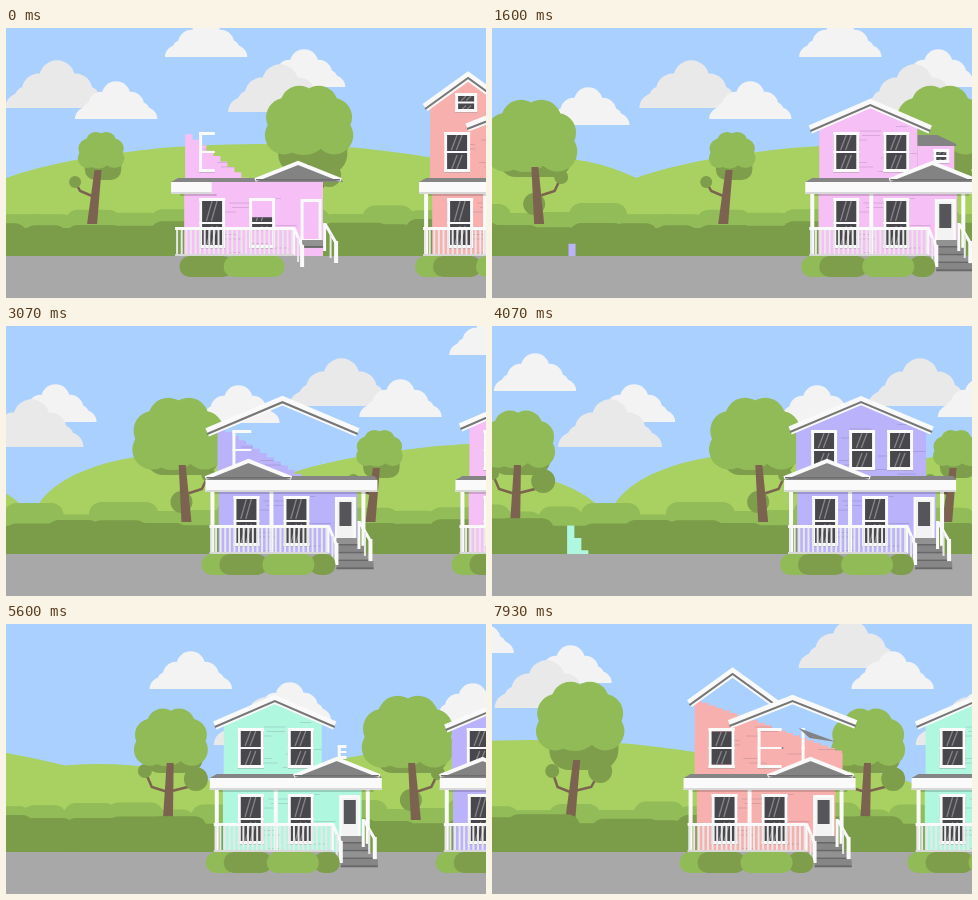
These frames come from a looping animation (480x270 px, 8 s). An HTML page with a canvas:

```html
<!DOCTYPE html>
<html lang="en">
<head>
<meta charset="utf-8">
<title>Street of houses</title>
<style>
html, body { margin: 0; width: 100%; height: 100%; overflow: hidden; background: #aad0ff; }
canvas { display: block; width: 100vw; height: 100vh; }
</style>
</head>
<body>
<canvas id="stage" width="480" height="270"></canvas>
<script>
const ctx = document.getElementById('stage').getContext('2d');
const LOOP = 8000, LAP = 10300;
const WHITE = '#fafafa', GREY = '#838383', GLASS = '#47474c';
const LEAF = '#91bb57', LEAF_DARK = '#7f9e4c', BARK = '#7c6350';

const clamp = v => Math.max(0, Math.min(1, v));
const prog = (t, start, length) => clamp((t - start) / length);
const ease = p => 1 - (1 - p) ** 3;
const pop = p => p <= 0 ? 0 : 1 + 2.4 * (p - 1) ** 3 + 1.4 * (p - 1) ** 2;
const noise = n => { const v = Math.sin(n * 127.1) * 43758.5; return v - Math.floor(v); };

function rect(x, y, w, h, color) {
  ctx.fillStyle = color;
  ctx.fillRect(x, y, w, h);
}
function round(x, y, w, h, r, color) {
  ctx.fillStyle = color;
  ctx.beginPath();
  ctx.roundRect(x, y, w, h, r);
  ctx.fill();
}
function disc(x, y, r, color) {
  ctx.fillStyle = color;
  ctx.beginPath();
  ctx.arc(x, y, r, 0, 7);
  ctx.fill();
}
function trace(points) {
  ctx.beginPath();
  points.forEach(([x, y]) => ctx.lineTo(x, y));
}
function poly(points, color) {
  trace(points);
  ctx.fillStyle = color;
  ctx.fill();
}
function line(points, width, color) {
  trace(points);
  ctx.lineWidth = width;
  ctx.strokeStyle = color;
  ctx.stroke();
}
function within(path, draw) {
  ctx.save();
  ctx.beginPath();
  path();
  ctx.clip();
  draw();
  ctx.restore();
}
function scaled(x, y, s, draw) {
  if (s <= 0) return;
  ctx.save();
  ctx.translate(x, y);
  ctx.scale(s, s);
  ctx.translate(-x, -y);
  draw();
  ctx.restore();
}
// A layer repeats once per lap; wider layers therefore move faster.
function layer(t, width, draw) {
  for (const turn of [t, t - LAP]) {
    ctx.save();
    ctx.translate(turn / LAP * width, 0);
    draw();
    ctx.restore();
  }
}

// ---- scenery ----
function cloud(x, base, w, color) {
  within(() => ctx.rect(x, base - w, w, w), () => {
    for (let i = 0; i < 5; i++) {
      const lift = Math.sin(Math.PI * i / 4) ** 1.5;
      disc(x + w * (0.15 + 0.175 * i), base - w * 0.28 * lift, w * (0.14 + 0.03 * lift), color);
    }
    round(x + w * 0.1, base - w * 0.2, w * 0.8, w * 0.3, w * 0.1, color);
  });
}
const bigCloud = (x, base) => cloud(x, base, 106, '#e9e9e9');
const smallCloud = (x, base) => cloud(x, base, 84, '#f3f3f3');

function clouds(t) {
  for (const [x, base] of [[-312, 121], [221, 84]]) {
    smallCloud(x + 35, base - 25);
    bigCloud(x, base);
  }
  if (t > 6130) bigCloud(-429, 44);
  smallCloud(-376, 65);
  bigCloud(-2, 80);
  smallCloud(68, 91);
  smallCloud(-94, 97);
  smallCloud(158, 29);
}

function hills() {
  for (const [x, rx, ry] of [[-411, 160, 60], [-105, 146, 72], [254, 316, 84]]) {
    ctx.fillStyle = '#a8d162';
    ctx.beginPath();
    ctx.ellipse(x, 200, rx, ry, 0, 0, 7);
    ctx.fill();
  }
}

// The crown is a ring of leaves around (x + shift), over a darker underside.
function tree(x, shift, w, top, bottom, ...twigs) {
  const cx = x + shift, cy = top + w * 0.48, lean = shift * 0.6;
  for (const [dx, y, r] of twigs) {
    line([[x, 168], [x + dx * 0.7, 163], [x + dx, y]], 2.5, BARK);
    disc(x + dx, y, r, LEAF_DARK);
  }
  round(cx - w * 0.34, cy, w * 0.76, bottom - cy, w * 0.22, LEAF_DARK);
  for (let i = 0; i < 6; i++) {
    const a = Math.PI * (0.9 + i * 0.24);
    disc(cx + w * 0.29 * Math.cos(a), cy + w * 0.27 * Math.sin(a), w * 0.21, LEAF);
  }
  disc(cx - w * 0.06, cy, w * 0.3, LEAF);
  poly([[x + lean - 3, bottom - 10], [x + lean + 4, bottom - 10], [x + 5, 196], [x - 5, 196]], BARK);
}
function trees() {
  tree(86, 9, 48, 103, 152, [-17, 154, 6]);
  tree(293, 10, 91, 56, 146, [-18, 147, 7], [30, 147, 12]);
  tree(-98, -8, 95, 70, 149, [22, 149, 7], [-5, 176, 11]);
  tree(-346, 3, 76, 83, 149, [-23, 147, 7], [28, 155, 12]);
}

function hedge(seed, top, spread, color) {
  const count = 22, step = 934 / count;
  for (let i = 0; i < count; i++) {
    const y = top + spread * noise(i + seed);
    round(-450 + i * step, y, 44 + 32 * noise(i * 3 + seed), 235 - y, 12, color);
  }
  rect(-450, top + spread, 940, 228 - top - spread, color);
}

// ---- house parts ----
// Boards rise fastest on the left; the unfinished edge falls away in steps.
function stairs(x, bottom, w, h, p) {
  const slope = 4.5 * (1 - p) ** 2;
  for (let dx = 0; dx < w; dx += 7) {
    const up = h * p - dx * slope;
    if (up > 0) ctx.rect(x + dx, bottom - up, Math.min(7.3, w - dx), up);
  }
}
function boards(x, y, w, h) {
  for (let i = 0; i < h / 4; i++) {
    rect(x + noise(i + 4) * w * 0.85, y + i * 4.5, 8 + 14 * noise(i + 9), 1, 'rgba(60,60,90,.16)');
  }
}
function windowAt(x, y, w, h, p) {
  if (p <= 0) return;
  const reach = w * clamp(p * 2), open = clamp(p * 2 - 0.9), mid = y + h / 2;
  within(() => ctx.rect(x, mid - h / 2 * open, w, h * open), () => {
    rect(x, y, w, h, GLASS);
    for (let i = 0; i < 4; i++) {
      const dx = x + w * 0.28 + (i % 2) * 5, dy = y + (i >> 1) * h / 2;
      line([[dx, dy + h / 2 - 2], [dx + w * 0.22, dy + 3]], 1.3, '#85858a');
    }
  });
  rect(x, y, reach, 3, WHITE);
  rect(x, mid - 1, reach, 2, WHITE);
  rect(x, y + h - 3, reach, 3, WHITE);
  rect(x, y, 3, h, WHITE);
  if (p > 0.5) rect(x + w - 3, y, 3, h, WHITE);
  rect(x, y + h, reach, 1, '#99999977');
}
const roofLine = ([center, half, peak, rise], drop) =>
  [[center - half, peak + rise + drop], [center, peak + drop], [center + half, peak + rise + drop]];

function roof(shape, p) {
  scaled(shape[0], shape[2], pop(p), () => {
    line(roofLine(shape, 1.5), 8.5, WHITE);
    line(roofLine(shape, 3), 2, '#777');
  });
}
function gable(center, p) {
  const shape = [center, 43, 135, 17];
  scaled(center, 152, pop(p), () => {
    poly(roofLine(shape, 0), GREY);
    line(roofLine(shape, 0), 4, WHITE);
    rect(center - 42, 151, 84, 1.5, '#6e6e6e');
  });
}
function railing(p) {
  if (p <= 0) return;
  const w = 119 * p;
  for (let x = 0; x <= w; x += 4.6) rect(5 + x, 200, 2, 28, '#e8e8e8');
  rect(4, 199, w, 3, WHITE);
  rect(4, 226, w, 2, '#d8d8d8');
}
function steps(p) {
  for (let i = 0; i < Math.round(p * 4); i++) {
    const w = 23 + i * 4.7, y = 212 + i * 7.8;
    rect(131, y, w, 7.8, i % 2 ? '#868686' : '#929292');
    rect(131, y + 6, w, 1.8, '#686868');
  }
}
function handrail(x, y, dx) {
  line([[x, y], [x + dx, y + 19]], 3, WHITE);
  rect(x - 2, y - 1, 3, 28, WHITE);
  rect(x + dx - 2, y + 17, 4, 22, WHITE);
  rect(x + dx / 2 - 1, y + 10, 2, 24, '#e8e8e8');
}
function bushes(p, spread) {
  const leaf = (from, to, color) => round(from, 228, to - from, 21, 10, color);
  const dx = 11 * (1 - spread);
  scaled(62, 249, pop(p), () => {
    if (spread > 0) leaf(-4 + dx, 28, LEAF);
    leaf(14 - dx * 0.5, 62, LEAF_DARK);
    if (spread > 0) leaf(104 - dx, 130 - dx, LEAF_DARK);
    leaf(57 - dx * 0.4, 109 + dx * 0.4, LEAF);
  });
}
function door(p) {
  if (p <= 0) return;
  ctx.lineWidth = 3;
  ctx.strokeStyle = WHITE;
  ctx.strokeRect(131, 172.5, 18, 40);
  if (p < 0.6) return;
  rect(132, 174, 16, 38, '#f3f3f3');
  rect(134, 176, 12, 24, '#55555a');
}
function annex(color, p) {
  if (p > 0.4) {
    rect(112, 117, 37, 36, color);
    poly([[112, 107], [132, 107], [151, 116], [151, 118], [112, 118]], GREY);
  }
  windowAt(128, 121, 16, 14, p);
}

// roofs: center, half width, peak, rise; wall: left, width
const STYLES = {
  wide: { wall: [14, 98], roofs: [[65, 60, 74, 26]], windows: [28, 78], gable: 127, annex: true },
  triple: { wall: [12, 130], roofs: [[77, 71, 73, 30]], windows: [27, 65, 103], gable: 43 },
  double: {
    wall: [11, 148], roofs: [[49, 43, 47, 31], [109, 61, 74, 24]],
    windows: [25, 74, 118], gable: 127, attic: true
  }
};
// porch, upper, top: moments in ms at which these stages are due
const HOUSES = [
  { x: 413, color: '#f8b0ae', style: 'double', porch: -3430, upper: -2800, top: -2550 },
  { x: 165, color: '#f6bff5', style: 'wide', porch: 0, upper: -350, top: 100 },
  { x: -85, color: '#bab2fa', style: 'triple', porch: 2065, upper: 2690, top: 2930 },
  { x: -315, color: '#b0f7df', style: 'wide', porch: 4460, upper: 4650, top: 5020 },
  { x: -543, color: '#f8b0ae', style: 'double', porch: 6870, upper: 7500, top: 7740 }
];

function upperFloor({ style, color, upper, top }, at) {
  const s = STYLES[style], [left, width] = s.wall, peak = s.roofs[0][2];
  if (s.annex) annex(color, at(top + 500, 300));
  within(() => stairs(left, 152, width, 152 - peak, at(upper, 600)), () => {
    for (const shape of s.roofs) {
      const [center, half] = shape;
      poly([[center - half, 152], ...roofLine(shape, 2), [center + half, 152]], color);
    }
    boards(left, 98, width, 50);
  });
  s.roofs.forEach((shape, i) => roof(shape, at(top + i * 30, 200)));
  const lead = s.attic ? 1 : 0;
  s.windows.forEach((x, i) => windowAt(x, 104, 26, 40, at(upper + 200 + (i - lead) * 200, 500)));
  if (s.attic) {
    windowAt(36, 65, 22, 19, at(top + 250, 300));
    const p = at(top + 130, 200);
    if (p > 0 && p < 1) poly([[115, 104], [153, 118], [126, 114]], GREY);
  }
}

function groundFloor({ style, color, porch }, at) {
  within(() => stairs(13, 228, 139, 76, at(porch - 520, 350)), () => {
    rect(13, 152, 139, 76, color);
    if (at(porch, 1)) boards(13, 170, 110, 50);
  });
  [28, 78].forEach((x, i) => windowAt(x, 170, 26, 50, at(porch - 300 + i * 115, 330)));
  door(at(porch - 100, 300));

  const beam = 172 * ease(at(porch - 35, 420)), slope = 172 * at(porch - 220, 160);
  for (const x of [5, 64, 156]) rect(x, 166, 4, 62 * at(porch + 120, 200), WHITE);
  if (slope) poly([[7, 150], [slope - 3, 150], [slope, 154], [0, 154]], '#858585');
  rect(0, 154, beam, 12, WHITE);
  rect(0, 164, beam, 2, '#d8d8d8');
  rect(9, 166, beam * 0.9, 2, 'rgba(0,0,0,.16)');
  gable(STYLES[style].gable, at(porch - 230, 200));

  steps(at(porch - 60, 240));
  if (at(porch - 120, 120)) {
    handrail(123, 200, 8);
    handrail(154, 196, 11);
  }
  railing(ease(at(porch - 280, 230)));
  bushes(at(porch - 220, 200), ease(at(porch + 80, 200)));
}

function draw(t) {
  const at = (from, length) => prog(t, from, length);
  rect(0, 0, 480, 270, '#aad0ff');
  layer(t, 954, () => clouds(t));
  layer(t, 927, hills);
  layer(t, 934, () => hedge(31, 175, 14, '#91bc57'));
  layer(t, 934, trees);
  layer(t, 934, () => hedge(7, 190, 10, '#7b9c49'));
  rect(0, 228, 480, 42, '#a8a8a8');
  for (const h of HOUSES) {
    ctx.save();
    ctx.translate(h.x + t / LAP * 954, 0);
    upperFloor(h, at);
    groundFloor(h, at);
    ctx.restore();
  }
}

function frame() {
  draw(performance.now() % LOOP);
  requestAnimationFrame(frame);
}
frame();
</script>
</body>
</html>
```
